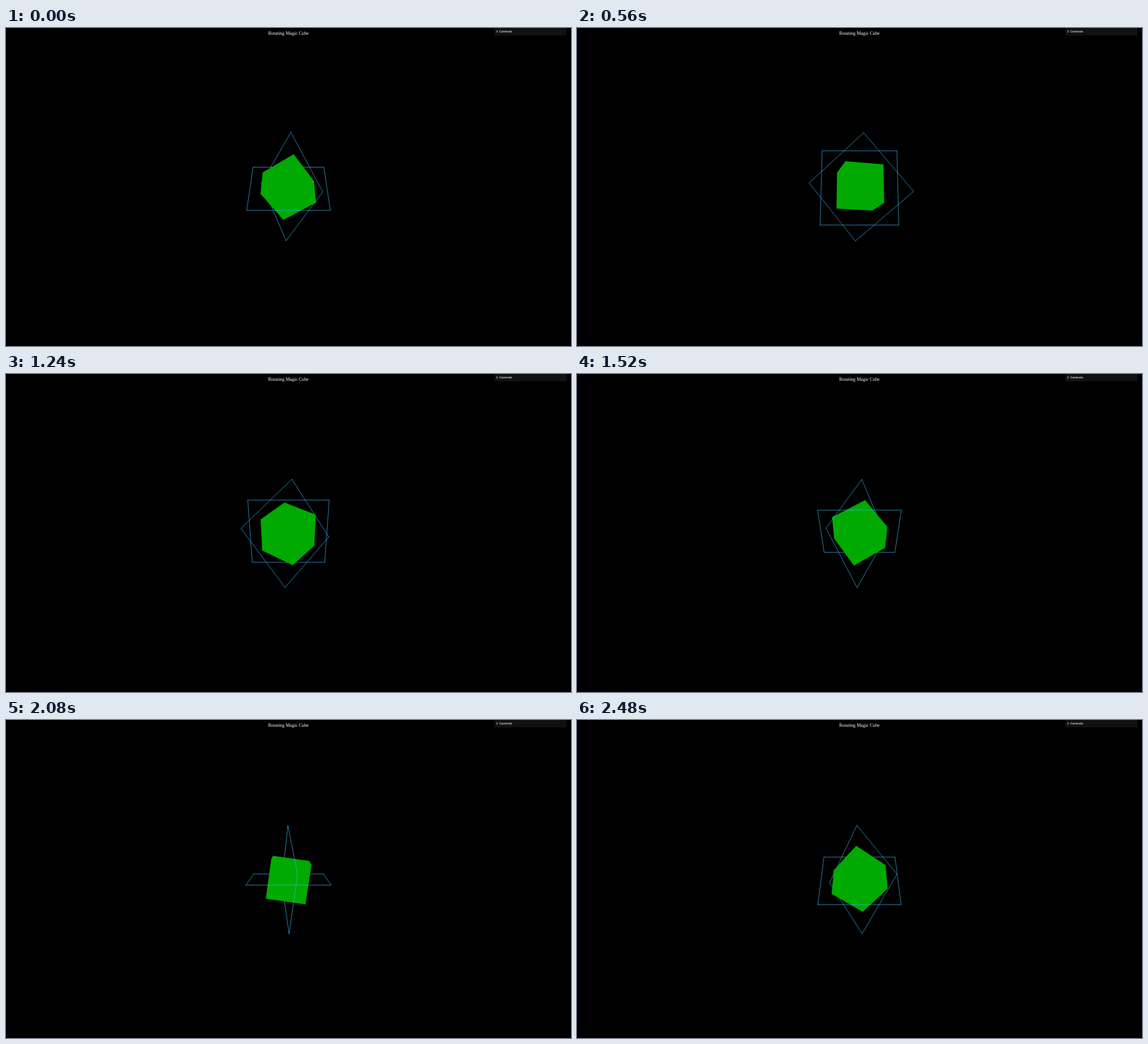
An HTML page for the animation above (2.52 s loop, 998 by 561 pixels).

```html
<!DOCTYPE html>
<html lang="en">
<head>
<meta charset="utf-8">
<title>Rotating Magic Cube</title>
<style>
  html, body { margin: 0; width: 100%; height: 100%; overflow: hidden; background: #000; }
  svg { display: block; width: 998px; height: 561px; }
  .wire { fill: none; stroke: #3cb0ea; stroke-width: .75; stroke-linecap: round; }
</style>
</head>
<body>
<svg viewBox="0 0 998 561">
  <rect width="998" height="561" fill="#000"/>
  <path id="back" class="wire"/>
  <path id="cube" fill="#00aa00"/>
  <path id="front" class="wire"/>
  <text x="499" y="12.4" text-anchor="middle" fill="#fff" font-size="8.32"
    font-family="'Liberation Serif', 'Times New Roman', serif">Rotating Magic Cube</text>
  <rect x="862.8" y="0" width="127.4" height="13" fill="#111"/>
  <path d="M866.3 4.2l2 2l-2 2" fill="none" stroke="#ebebeb" stroke-width="1"/>
  <text x="871.3" y="8.3" fill="#ebebeb" font-size="5.6" font-weight="600"
    font-family="'Open Sans', 'Noto Sans', sans-serif">Controls</text>
</svg>
<script>
const LOOP = 2520, STEP = 40;
const CX = 499, CY = 280.5, DIST = 20;
const FOCAL = CY / Math.tan(Math.PI / 8); // 45 degree field of view
const TILT = Math.PI / 4 - 0.0785;

// spin angle in degrees at given times; the speed wavers slightly
const KEYS = [[0, -56], [560, -15.1], [880, 6.4], [1240, 36.2],
              [1800, 77.6], [2080, 98.2], [2480, 128]];

const { sin, cos } = Math;
const rotX = ([x, y, z], a) => [x, y * cos(a) - z * sin(a), y * sin(a) + z * cos(a)];
const rotY = ([x, y, z], a) => [x * cos(a) + z * sin(a), y, z * cos(a) - x * sin(a)];
const rotZ = ([x, y, z], a) => [x * cos(a) - y * sin(a), x * sin(a) + y * cos(a), z];

const square = [[-2, 2, 0], [2, 2, 0], [2, -2, 0], [-2, -2, 0]];
const diamond = square.map(p => rotZ(p, TILT));
const corners = [];
for (const x of [-1, 1]) for (const y of [-1, 1]) for (const z of [-1, 1]) corners.push([x, y, z]);

function spin(t) {
  let i = 1;
  while (i < KEYS.length - 1 && t > KEYS[i][0]) i++;
  const [t0, a0] = KEYS[i - 1], [t1, a1] = KEYS[i];
  return (a0 + (a1 - a0) * (t - t0) / (t1 - t0)) * Math.PI / 180;
}

function project([x, y, z]) {
  const k = FOCAL / (DIST - z);
  return [CX + x * k, CY - y * k];
}

const path = pts => 'M' + pts.map(p => p.map(v => v.toFixed(2)).join(' ')).join('L');

// convex outline of a set of points
function hull(pts) {
  const half = list => {
    const out = [];
    for (const p of list) {
      while (out.length > 1) {
        const [a, b] = out.slice(-2);
        if ((b[0] - a[0]) * (p[1] - a[1]) - (b[1] - a[1]) * (p[0] - a[0]) > 0) break;
        out.pop();
      }
      out.push(p);
    }
    return out.slice(0, -1);
  };
  const sorted = [...pts].sort((a, b) => a[0] - b[0] || a[1] - b[1]);
  return half(sorted).concat(half(sorted.reverse()));
}

const put = (id, d) => document.getElementById(id).setAttribute('d', d);

function draw(t) {
  const a = spin(t);
  let back = '', front = '';
  for (const loop of [square.map(p => rotX(p, a)), diamond.map(p => rotY(p, a))]) {
    loop.forEach((p, i) => {
      const q = loop[(i + 1) % 4];
      const d = path([project(p), project(q)]);
      if (p[2] + q[2] > 0) front += d; else back += d;
    });
  }
  put('back', back);
  put('front', front);
  put('cube', path(hull(corners.map(p => project(rotX(rotY(p, -a), a))))) + 'Z');
}

let start;
function tick(now) {
  start ??= now;
  draw(Math.floor((now - start) % LOOP / STEP) * STEP);
  requestAnimationFrame(tick);
}
draw(0);
requestAnimationFrame(tick);
</script>
</body>
</html>
```
